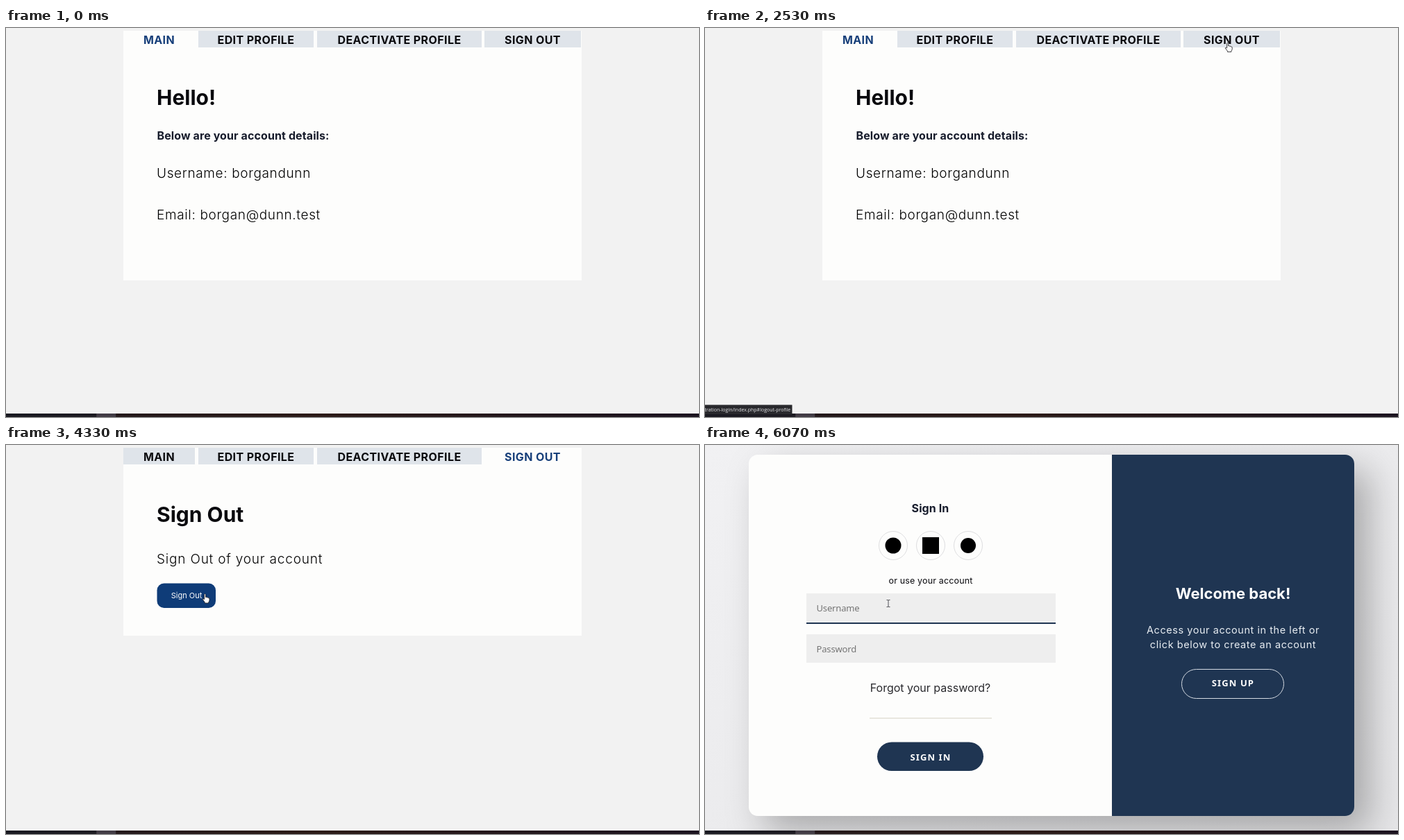
These frames come from a looping animation (998 px wide and 561 px high, 6110 ms). An HTML page:

```html
<!DOCTYPE html>
<html lang="en">
<head>
<meta charset="utf-8">
<title>Account sign out</title>
<style>
  html, body { margin: 0; width: 100%; height: 100%; overflow: hidden; background: #f2f2f2; }
  svg { display: block; width: 998px; height: 561px; }
  text { font-family: Inter, "Open Sans", sans-serif; fill: #0a0a0e; }
  .tab rect { fill: #dfe4ea; }
  .tab text { font-size: 16px; font-weight: 700; letter-spacing: .4px; text-anchor: middle; }
  .tab.on rect { fill: #fdfdfc; }
  .tab.on text { fill: #173f7a; }
  .title { font-size: 30px; font-weight: 700; }
  .lead { font-size: 16px; font-weight: 700; fill: #171c2c; letter-spacing: .1px; }
  .light { font-size: 19px; font-weight: 300; letter-spacing: .65px; fill: #000; }
  .mid { text-anchor: middle; }
  .hint { font: 13px "Noto Sans", sans-serif; letter-spacing: -.15px; fill: #757575; }
  .pill { font: 700 13px "Noto Sans", sans-serif; letter-spacing: 1.1px; fill: #fff; text-anchor: middle; }
  .note { font-size: 14.5px; letter-spacing: .55px; fill: #e8edf2; text-anchor: middle; }
  .status { font: 7px "Open Sans", sans-serif; fill: #e4e4e7; }
  .card { filter: drop-shadow(22px 22px 26px rgba(0, 0, 0, .28)); }
</style>
</head>
<body>
<svg viewBox="0 0 998 561">
  <defs>
    <linearGradient id="bar">
      <stop offset="0" stop-color="#1a1a22"/>
      <stop offset=".13" stop-color="#1d1b22"/>
      <stop offset=".131" stop-color="#423c45"/>
      <stop offset=".158" stop-color="#423c45"/>
      <stop offset=".159" stop-color="#24191b"/>
      <stop offset=".45" stop-color="#2c1b18"/>
      <stop offset="1" stop-color="#1c1420"/>
    </linearGradient>
    <linearGradient id="haze" x2="1" y2="1">
      <stop offset="0" stop-color="#f1f1f3"/>
      <stop offset="1" stop-color="#e6e6e8"/>
    </linearGradient>
    <clipPath id="round"><rect x="63" y="14" width="872" height="521" rx="13"/></clipPath>
  </defs>

  <g id="account">
    <rect width="998" height="561" fill="#f2f2f2"/>
    <rect id="panel" x="169" y="4" width="660" height="360" fill="#fdfdfc"/>
    <g id="tabs"></g>
    <g id="hello">
      <text class="title" x="217" y="111">Hello!</text>
      <text class="lead" x="217.5" y="161">Below are your account details:</text>
      <text class="light" x="217" y="215.5">Username: borgandunn</text>
      <text class="light" x="217" y="275.5">Email: borgan@dunn.test</text>
    </g>
    <g id="leave">
      <text class="title" x="217" y="111">Sign Out</text>
      <text class="light" x="217" y="170.5" style="letter-spacing:.8px">Sign Out of your account</text>
      <rect x="217.500" y="199.500" width="84.500" height="35.500" rx="10" fill="#0f3c78"/>
      <text class="mid" x="260" y="221" style="font-size:11px;fill:#fff">Sign Out</text>
    </g>
  </g>

  <g id="login">
    <rect width="998" height="561" fill="url(#haze)"/>
    <rect class="card" x="63" y="14" width="872" height="521" rx="13" fill="#fdfdfc"/>
    <rect x="586" y="14" width="349" height="521" fill="#1f3552" clip-path="url(#round)"/>
    <text class="lead mid" x="324.5" y="97">Sign In</text>
    <g fill="none" stroke="#dedee0">
      <circle cx="271" cy="145" r="20.500"/>
      <circle cx="325" cy="145" r="20.500"/>
      <circle cx="379" cy="145" r="20.500"/>
    </g>
    <circle cx="271" cy="145" r="11.500"/>
    <rect x="313" y="133" width="24" height="24"/>
    <circle cx="379" cy="145" r="11"/>
    <text class="mid" x="325" y="200" style="font-size:12.5px;letter-spacing:.15px">or use your account</text>
    <rect x="146" y="214" width="359" height="42" fill="#eee"/>
    <rect x="146" y="273" width="359" height="41" fill="#eee"/>
    <rect id="focus" x="146" y="256" width="359" height="2" fill="#1f3552"/>
    <text class="hint" x="160.5" y="240">Username</text>
    <text class="hint" x="160.5" y="299">Password</text>
    <text class="mid" x="324.5" y="356" style="font-size:16px;fill:#2a2a2e">Forgot your password?</text>
    <rect x="237" y="393" width="176" height="2" fill="#e9e7df"/>
    <rect x="248" y="428.500" width="153" height="41.500" rx="20.750" fill="#1f3552"/>
    <text class="pill" x="325" y="455">SIGN IN</text>
    <text class="mid" x="760.5" y="222" style="font-size:22px;font-weight:700;fill:#fff">Welcome back!</text>
    <text class="note" x="760.5" y="272">Access your account in the left or</text>
    <text class="note" x="760.5" y="292.500">click below to create an account</text>
    <rect x="686.500" y="323.500" width="147" height="42" rx="21" fill="none" stroke="#d5dbe3"/>
    <text class="pill" x="760.5" y="348">SIGN UP</text>
  </g>

  <rect y="556" width="998" height="5" fill="url(#bar)"/>
  <g id="status">
    <rect y="543.500" width="125.500" height="13.500" fill="#29292d"/>
    <text class="status" x="-.5" y="553">tration-login/index.php#logout-profile</text>
  </g>

  <g id="pointer" stroke="#26262a" stroke-linejoin="round">
    <path id="hand" fill="#fff" stroke-width=".9" d="M-2.500 1V-5.500Q-1.500-7-.5-5.500V-1.500Q1-2.300 1.600-1Q3-1.700 3.500-.3Q5-.7 5 1V3Q4.600 5 3.700 5.800V7H-1.800V5.800L-5 1.500Q-4.300 0-2.500 1.500Z"/>
    <path id="arrow" fill="#fff" stroke-width=".9" d="M-3-6V5L-.6 2.900 1 6.500 2.600 5.800 1.100 2.300H4.500Z"/>
    <path id="beam" fill="none" stroke="#55555a" d="M-2.500-5H-.7Q0-5 0-4.300Q0-5 .7-5H2.500M0-4.500V4.500M-2.500 5H-.7Q0 5 0 4.300Q0 5 .7 5H2.500"/>
  </g>
</svg>
<script>
const LOOP = 6110;
const CLICK_TAB = 3640, CLICK_BUTTON = 4620, FOCUS = 5600;

// time, x, y
const path = [
  [580, 746, -12], [760, 750, 24], [800, 751, 24.5], [1400, 754.5, 28],
  [3400, 754, 27], [3700, 754, 27], [4180, 291, 221], [4330, 288, 221],
  [4630, 288, 221], [4770, 266, 222], [5500, 264, 228.5]
];
const shapes = [[0, 'arrow'], [740, 'hand'], [3770, 'arrow'], [4150, 'hand'], [CLICK_BUTTON, 'beam']];
const tabs = [['MAIN', 169, 103], ['EDIT PROFILE', 277, 166], ['DEACTIVATE PROFILE', 448, 237], ['SIGN OUT', 689, 139]];

const el = id => document.getElementById(id);
const show = (id, on) => { el(id).style.display = on ? '' : 'none'; };

el('tabs').innerHTML = tabs.map(([name, x, w]) =>
  `<g class="tab"><rect x="${x}" y="4" width="${w}" height="24"/>` +
  `<text x="${x + w / 2}" y="22.500">${name}</text></g>`).join('');
const tabNodes = [...el('tabs').children];

function pointAt(t) {
  const i = path.findIndex(p => p[0] > t);
  if (i === 0) return path[0].slice(1);
  if (i < 0) return path[path.length - 1].slice(1);
  const [t0, x0, y0] = path[i - 1], [t1, x1, y1] = path[i];
  const k = (t - t0) / (t1 - t0), ease = k * k * (3 - 2 * k);
  return [x0 + (x1 - x0) * ease, y0 + (y1 - y0) * ease];
}

function draw(t) {
  const leaving = t >= CLICK_TAB, out = t >= CLICK_BUTTON;
  show('account', !out);
  show('login', out);
  show('hello', !leaving);
  show('leave', leaving);
  show('status', t >= 880 && t < 3800);
  show('focus', t >= FOCUS);
  el('panel').setAttribute('height', leaving ? 271 : 360);
  tabNodes.forEach((tab, i) => tab.classList.toggle('on', i === (leaving ? 3 : 0)));

  const [x, y] = pointAt(t);
  const shape = shapes.filter(s => s[0] <= t).pop()[1];
  el('pointer').setAttribute('transform', `translate(${x} ${y})`);
  for (const id of ['hand', 'arrow', 'beam']) show(id, id === shape);
}

const start = performance.now();
function tick() {
  draw((performance.now() - start) % LOOP);
  requestAnimationFrame(tick);
}
tick();
</script>
</body>
</html>
```
